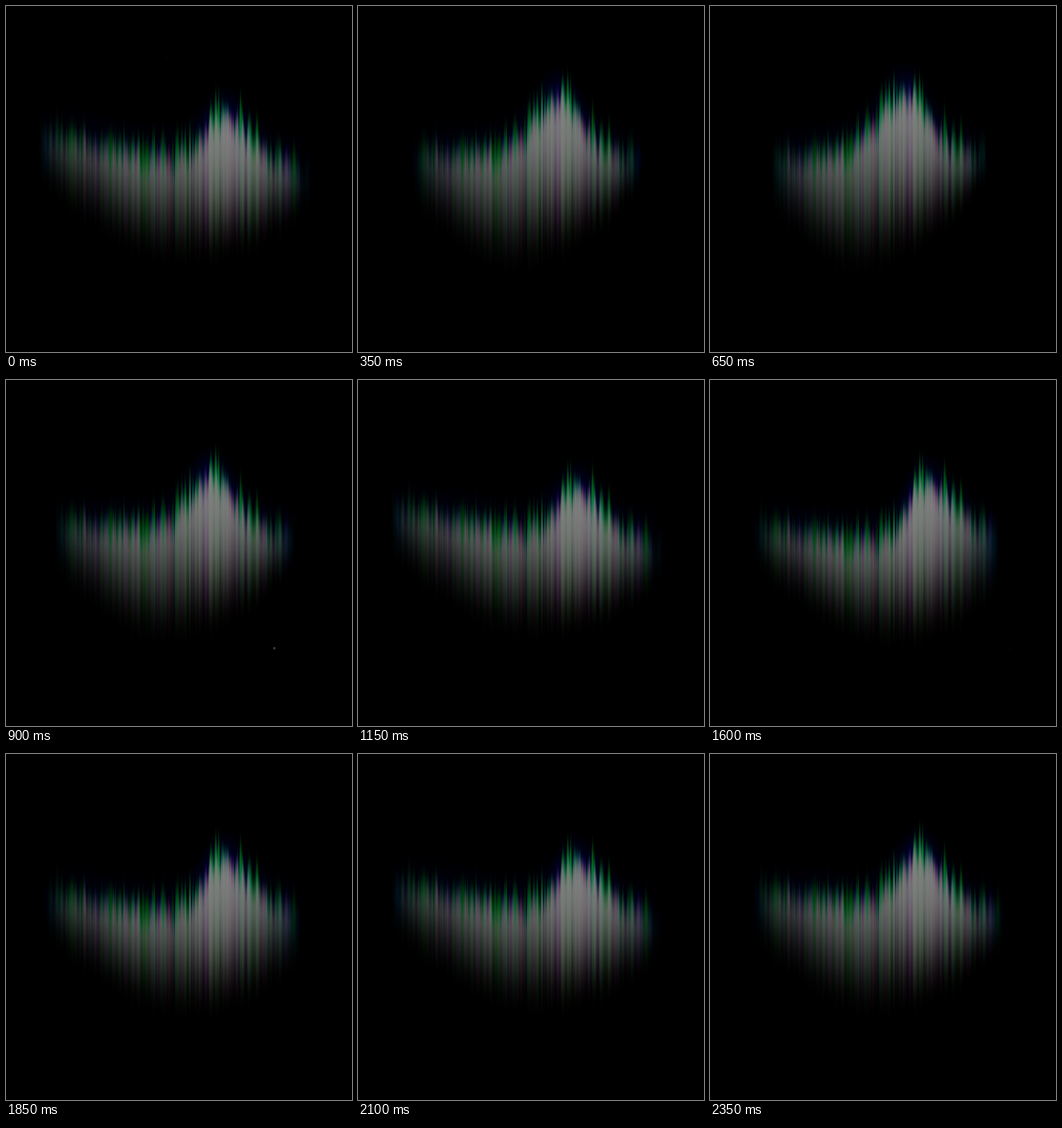
An HTML page with a canvas for the animation above (2.4 s loop, 500 by 500 pixels).

```html
<!DOCTYPE html>
<html lang="en">
<head>
<meta charset="utf-8">
<title>Aurora</title>
<style>
html, body { margin: 0; width: 100%; height: 100%; overflow: hidden; background: #000; }
canvas { display: block; width: 100vw; height: 100vh; }
</style>
</head>
<body>
<canvas id="sky" width="500" height="500"></canvas>
<script>
const SIZE = 500, LOOP = 2400, STEP = 50;
const Y0 = 70, Y1 = 410;
const ctx = document.getElementById('sky').getContext('2d');
const img = ctx.createImageData(SIZE, Y1 - Y0);

// The curtain sways from REST towards TALL (swing 1) or LEAN (swing -1)
const REST = {
  left: 47, right: 438, mid: 260, depth: 366, lowLeft: 245, lowRight: 290,
  crestLeft: 178, crestRight: 222, dip: 12, peakX: 316, peakH: 52, wideL: 40, wideR: 44
};
const TALL = {
  left: 89, right: 400, mid: 220, depth: 378, lowLeft: 285, lowRight: 240,
  crestLeft: 208, crestRight: 205, dip: 0, peakX: 281, peakH: 84, wideL: 55, wideR: 47
};
const LEAN = {
  left: 64, right: 416, mid: 272, depth: 378, lowLeft: 260, lowRight: 300,
  crestLeft: 205, crestRight: 210, dip: 17, peakX: 308, peakH: 63, wideL: 30, wideR: 56
};
const SWING_T = [0, 350, 650, 1150, 1600, 1850, 2350];
const SWING = [0, .78, 1, 0, -1, -.62, .4];

const clamp = (v, a = 0, b = 1) => Math.min(b, Math.max(a, v));
const mix = (a, b, u) => a + (b - a) * u;
const smooth = v => { v = clamp(v); return v * v * (3 - 2 * v); };
const bell = v => Math.exp(-v * v);
const rand = n => { const s = Math.sin(n * 127.1 + 11.7) * 43758.5453; return s - Math.floor(s); };

function noise(x, seed) {
  const i = Math.floor(x), k = seed * 1000 + i;
  return mix(rand(k), rand(k + 1), smooth(x - i));
}

// Hermite curve through the points ys at xs
function spline(xs, ys, x) {
  const last = xs.length - 1;
  x = clamp(x, xs[0], xs[last]);
  let i = 0;
  while (i < last - 1 && x > xs[i + 1]) i++;
  const slope = j => {
    const a = Math.max(j - 1, 0), b = Math.min(j + 1, last);
    return (ys[b] - ys[a]) / (xs[b] - xs[a]);
  };
  const h = xs[i + 1] - xs[i], u = (x - xs[i]) / h, v = 1 - u;
  return ys[i] * (1 + 2 * u) * v * v + ys[i + 1] * u * u * (3 - 2 * u) +
    h * (slope(i) * u * v * v - slope(i + 1) * u * u * v);
}

// Stripes stay in place and get finer towards the middle
const RAYS = [170, 227, 253, 302, 338];
const stripes = Array.from({ length: SIZE }, (_, x) => {
  const w = 110 * Math.asinh((x - 245) / 110) + 400;
  const shared = .55 * noise(w / 2.6, 1) + .45 * noise(w / 1.2, 2);
  const own = seed => .55 * shared + .45 * noise(w / 2.8, seed);
  const red = own(3);
  return {
    red, green: own(4), blue: .7 * red + .3 * own(5),
    tip: 26 * noise(w / 1.6, 6) ** 3 + RAYS.reduce((s, c) => s + 24 * bell((x - c) / 1.6), 0)
  };
});

const FALL = Array.from({ length: 257 }, (_, i) => (1 - (i / 256) ** 1.3) ** 2.4);
const GLOW = Array.from({ length: 1025 }, (_, i) => 130 * (1 - Math.exp(-i / 200)));
const glow = k => GLOW[Math.min(1024, Math.round(k * 200))];

function poseAt(t) {
  const s = spline(SWING_T, SWING, t), end = s > 0 ? TALL : LEAN, pose = {};
  for (const key in REST) pose[key] = mix(REST[key], end[key], Math.abs(s));
  return pose;
}

function crestAt(x, p) {
  const line = mix(p.crestLeft, p.crestRight, (x - p.left) / (p.right - p.left));
  const d = x - p.peakX;
  return line + p.dip * bell((x - 205) / 65) - p.peakH * bell(d / (d < 0 ? p.wideL : p.wideR));
}

function column(x, p, crest) {
  const { red, green, blue, tip } = stripes[x];
  const onLeft = x < p.mid;
  const far = (x - p.mid) / ((onLeft ? p.left : p.right) - p.mid);
  const depth = mix(p.depth, onLeft ? p.lowLeft : p.lowRight, Math.min(far, 1.1) ** 1.8);
  const inside = Math.min(x - p.left, p.right - x);
  const power = .95 + .4 * smooth((x - 100) / 90) + 2.1 * bell((x - p.peakX) / 40);
  const channel = (n, lift, inset, gain) => {
    const top = crest + 16 - 52 * n - lift;
    return {
      n, top,
      span: 54 + lift * .9,
      low: depth + 14 + (n - .5) * 40,
      k: power * gain * (1 - Math.exp(-Math.max(0, inside - inset) / 28))
    };
  };
  return [
    channel(red, 0, 8, .96),
    channel(green, 10 + tip, 0, 1.04),
    channel(blue, 10, -3, 1)
  ];
}

function level(c, y, crest) {
  if (y <= c.top || y >= c.low) return 0;
  const v = clamp((y - crest) / (c.low - crest));
  return c.k * smooth((y - c.top) / c.span) ** 1.4 * FALL[Math.round(v * 256)] *
    Math.max(0, 1 + (.8 + .5 * v) * (c.n - .5));
}

function dust(step) {
  const r = .7 + 1.3 * rand(step + 31) ** 6;
  ctx.fillStyle = `rgba(200,205,205,${.15 * r})`;
  ctx.beginPath();
  ctx.arc(20 + 460 * rand(step + 71), 20 + 450 * rand(step + 139), r, 0, 2 * Math.PI);
  ctx.fill();
}

function draw(step) {
  const p = poseAt(step * STEP), px = img.data;
  px.fill(0);
  for (let i = 3; i < px.length; i += 4) px[i] = 255;
  for (let x = Math.floor(p.left) - 4; x < p.right + 4; x++) {
    const crest = crestAt(x, p), [r, g, b] = column(x, p, crest);
    for (let y = Y0; y < Y1; y++) {
      const i = ((y - Y0) * SIZE + x) * 4;
      const haze = .07 * b.k * smooth((y - crest + 50) / 45) * smooth((crest + 30 - y) / 40);
      px[i] = glow(level(r, y, crest));
      px[i + 1] = glow(level(g, y, crest));
      px[i + 2] = glow(level(b, y, crest) + haze);
    }
  }
  ctx.fillStyle = '#000';
  ctx.fillRect(0, 0, SIZE, SIZE);
  ctx.putImageData(img, 0, Y0);
  dust(step);
}

let shown = -1;
function tick() {
  const step = Math.floor((performance.now() % LOOP) / STEP);
  if (step !== shown) draw(shown = step);
  requestAnimationFrame(tick);
}
tick();
</script>
</body>
</html>
```
